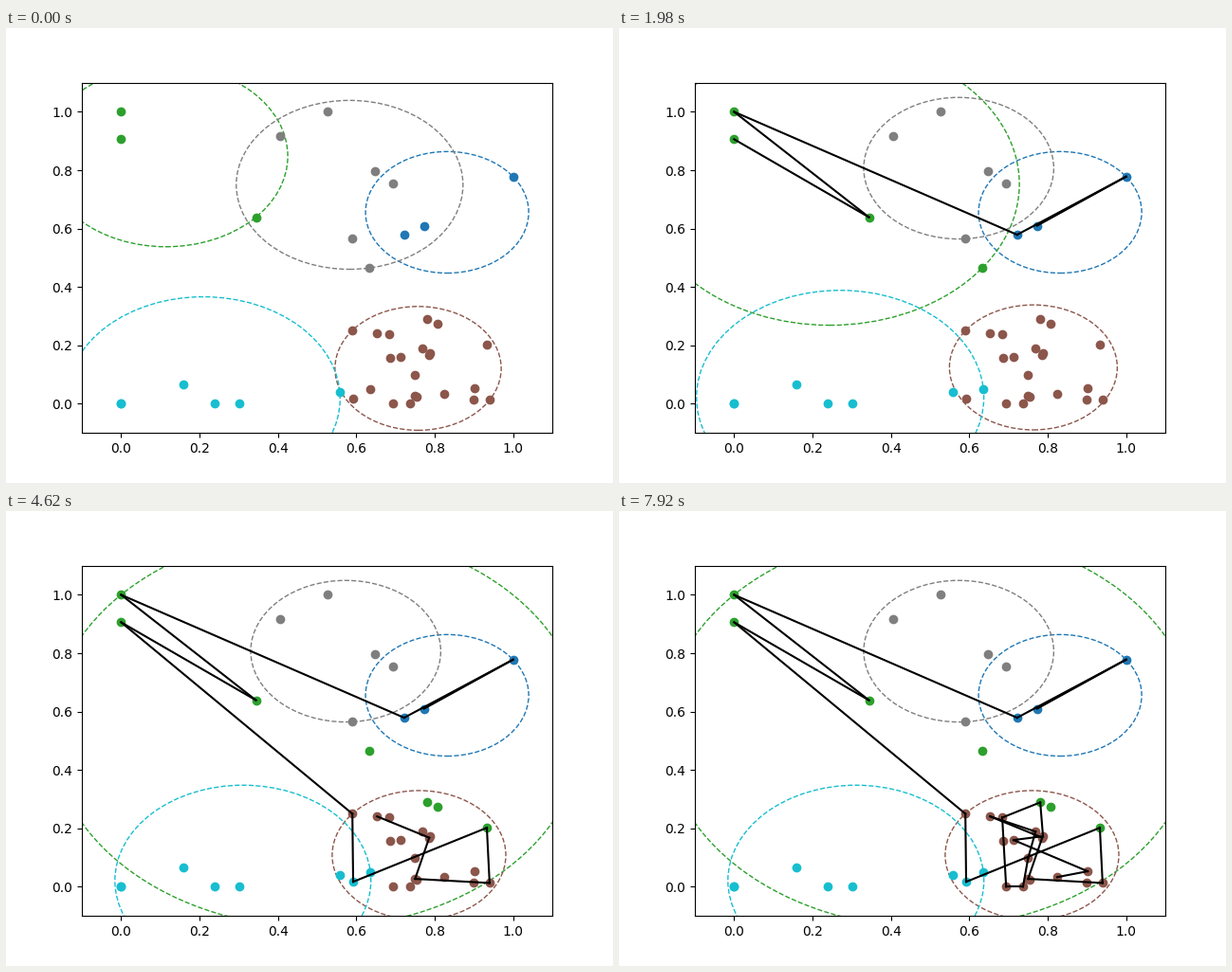
A matplotlib script for the animation above (8 s loop, 640 px wide and 480 px high).

```python
import matplotlib.pyplot as plt
import numpy as np
from matplotlib.animation import FuncAnimation

LOOP, INTERVAL, HOLD = 8000, 40, 330
REGROUP = (3, 7)  # steps that regroup the points instead of extending the route

# A point starts in the group whose seed is nearest.
SEEDS = {"C0": (.9, .65), "C2": (.15, .8), "C5": (.8, .1), "C7": (.6, .75), "C9": (.35, 0)}
BLUE, GREEN, BROWN, GREY, CYAN = SEEDS

# Stops in the order the route visits them.
route = np.array([
    (.773, .61), (1, .778), (.722, .579), (0, 1), (.344, .639), (0, .906),
    (.59, .25), (.592, .017), (.933, .202), (.94, .013), (.75, .027), (.786, .168),
    (.653, .241), (.769, .189), (.75, .098), (.737, 0), (.694, 0), (.684, .237),
    (.781, .289), (.788, .173), (.713, .16), (.902, .053), (.824, .033),
])
unvisited = np.array([
    (.527, 1), (.406, .917), (.648, .797), (.694, .755), (.59, .565), (.633, .465),
    (0, 0), (.159, .065), (.239, 0), (.302, 0), (.558, .039),
    (.636, .05), (.687, .156), (.753, .024), (.807, .273), (.899, .013),
])
origin = np.zeros((1, 2))  # a second point stacked on (0, 0)
points = np.vstack([route, unvisited, origin])


def group_stages():
    """Colour of every point at the start and after each regrouping."""
    x, y = points.T
    seeds = np.array(list(SEEDS.values()))
    nearest = np.linalg.norm(points[:, None] - seeds, axis=2).argmin(axis=1)
    start = np.array(list(SEEDS))[nearest]
    low_left = (start == BROWN) & (x < .65) & (y < .1)

    # green reaches down to the lowest grey point, cyan to the right
    second = start.copy()
    second[(start == GREY) & (y < .5)] = GREEN
    second[low_left & (x > .6)] = CYAN

    # green takes the upper right of brown, cyan all of its lower left
    third = second.copy()
    third[(start == BROWN) & (x + y > 1)] = GREEN
    third[low_left] = CYAN
    return start, second, third


def draw_group(members, color):
    """Points of one group and the circle around their mean."""
    center = members.mean(axis=0)
    radius = np.linalg.norm(members - center, axis=1).max()
    dots = ax.scatter(*members.T, color=color)
    ring = ax.add_patch(plt.Circle(center, radius, color=color, fill=False, ls="--"))
    return [dots, ring]


fig, ax = plt.subplots(figsize=(6.4, 4.8), dpi=100)
ax.set_xlim(-0.1, 1.1)
ax.set_ylim(-0.1, 1.1)

stages = [[artist for color in SEEDS for artist in draw_group(points[tags == color], color)]
          for tags in group_stages()]
legs = [ax.plot(*route[k:k + 2].T, "k-")[0] for k in range(len(route) - 1)]


def update(frame):
    # a step that begins inside this frame's time slot is shown with it
    step = (frame * INTERVAL + INTERVAL - 10) // HOLD
    stage = sum(step >= s for s in REGROUP)
    for k, artists in enumerate(stages):
        for artist in artists:
            artist.set_visible(k == stage)
    for k, leg in enumerate(legs):
        leg.set_visible(k < step - stage)
    return legs


anim = FuncAnimation(fig, update, frames=LOOP // INTERVAL, interval=INTERVAL,
                     init_func=lambda: update(0), repeat=True, repeat_delay=0)
plt.show()
```
